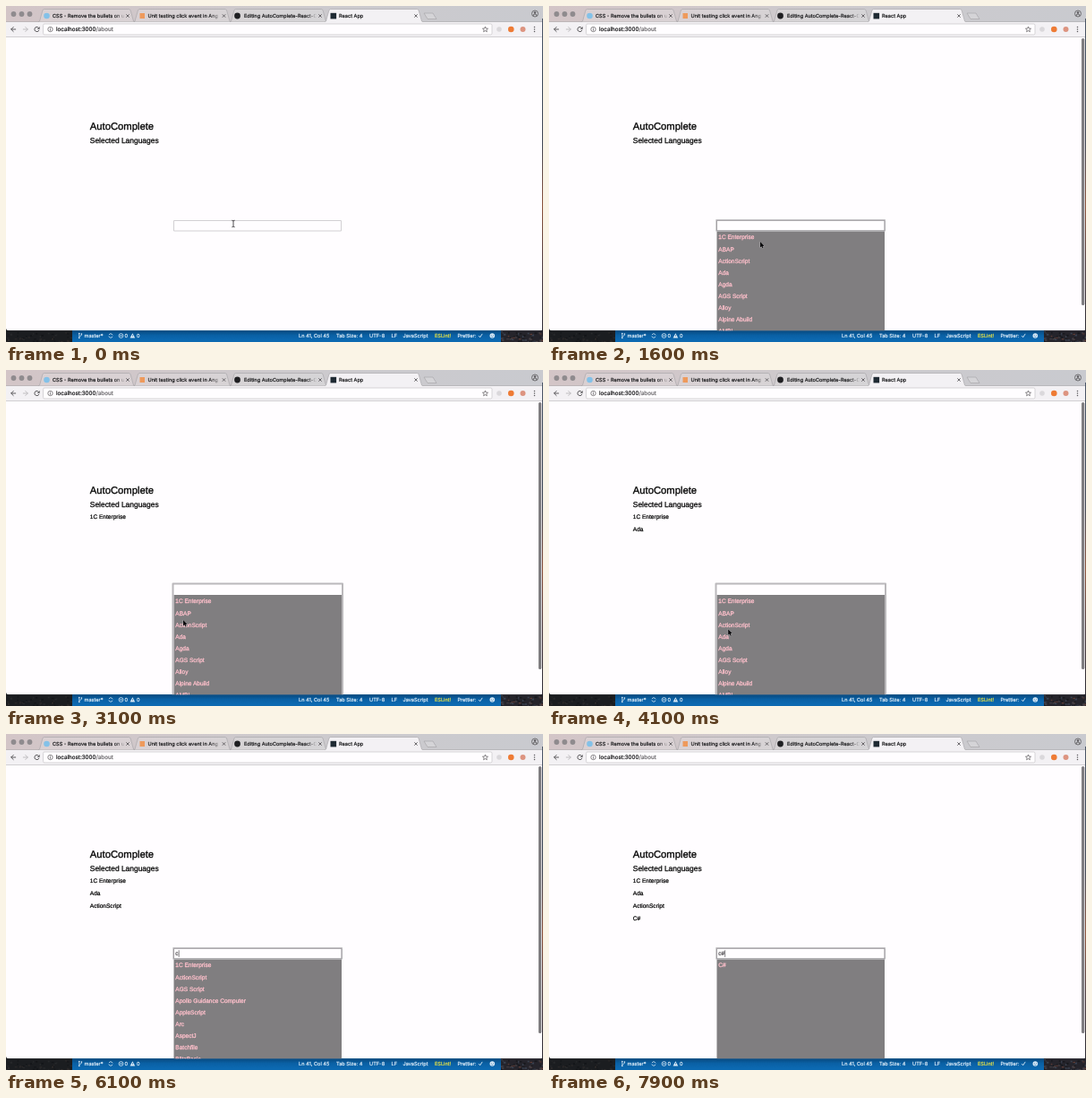
An HTML page with a canvas that plays this animation: 600x375 px, repeating every 8 s.

```html
<!DOCTYPE html>
<html lang="en">
<head>
<meta charset="utf-8">
<title>AutoComplete</title>
<style>
html, body { margin: 0; width: 100%; height: 100%; overflow: hidden; background: #fffdff; }
canvas { display: block; width: 600px; height: 375px; }
</style>
</head>
<body>
<canvas id="stage"></canvas>
<script>
const W = 600, H = 375, LOOP = 8000, STEP = 100;
const canvas = document.getElementById('stage');
const c = canvas.getContext('2d');
const dpr = window.devicePixelRatio || 1;
canvas.width = W * dpr;
canvas.height = H * dpr;

const PAGE = '"Liberation Sans", Arial, sans-serif';
const UI = 'Inter, Roboto, sans-serif';

const ALL = ['1C Enterprise', 'ABAP', 'ActionScript', 'Ada', 'Agda', 'AGS Script',
  'Alloy', 'Alpine Abuild', 'AMPL'];
const WITH_C = ['1C Enterprise', 'ActionScript', 'AGS Script', 'Apollo Guidance Computer',
  'AppleScript', 'Arc', 'AspectJ', 'Batchfile', 'BlitzBasic'];

// [time, language added to the selection]
const PICKS = [[2000, '1C Enterprise'], [3800, 'Ada'], [4600, 'ActionScript'], [7400, 'C#']];

// [time, x, y] of the pointer
const PATH = [[0, 254, 243], [100, 254, 244.5], [200, 254, 246], [900, 254, 246],
  [1300, 240, 259], [1600, 236, 263], [2000, 225, 259], [2400, 222, 259],
  [3100, 198, 279], [3500, 197, 294], [3900, 197, 294], [4400, 205, 282],
  [4700, 207, 281], [5000, 226.5, 253], [5300, 240, 246], [5800, 240, 246]];

const OPEN = 800, REFOCUS = 5400, KEY_C = 5800, KEY_HASH = 6600;

function rect(x, y, w, h, color) {
  c.fillStyle = color;
  c.fillRect(x, y, w, h);
}

function frame(x, y, w, h, color, width = 1) {
  c.strokeStyle = color;
  c.lineWidth = width;
  c.strokeRect(x, y, w, h);
}

// A hairline stroke gives the heavier look of smoothed screen type.
function text(s, x, y, size, color, family = PAGE, weight = 0.22) {
  c.font = `${size}px ${family}`;
  c.fillStyle = c.strokeStyle = color;
  c.lineWidth = weight;
  c.fillText(s, x, y);
  c.strokeText(s, x, y);
}

function dot(x, y, r, color) {
  c.fillStyle = color;
  c.beginPath();
  c.arc(x, y, r, 0, Math.PI * 2);
  c.fill();
}

function arc(x, y, r, color, width, from = 0, to = Math.PI * 2) {
  c.strokeStyle = color;
  c.lineWidth = width;
  c.beginPath();
  c.arc(x, y, r, from, to);
  c.stroke();
}

function trace(pts) {
  c.beginPath();
  for (let i = 0; i < pts.length; i += 2) c.lineTo(pts[i], pts[i + 1]);
}

function line(pts, color, width) {
  trace(pts);
  c.strokeStyle = color;
  c.lineWidth = width;
  c.stroke();
}

function poly(pts, color) {
  trace(pts);
  c.closePath();
  c.fillStyle = color;
  c.fill();
}

function gradient(x0, y0, x1, y1, ...colors) {
  const g = c.createLinearGradient(x0, y0, x1, y1);
  colors.forEach((color, i) => g.addColorStop(i / (colors.length - 1), color));
  return g;
}

function tab(x, w, title, active) {
  const fill = active ? '#f3f1f4' : 'rgba(255,255,255,0.18)';
  const edge = [x, 18, x + 1.5, 17, x + 5, 4.5, x + 6.5, 3.5,
    x + w - 6.5, 3.5, x + w - 5, 4.5, x + w - 1.5, 17, x + w, 18];
  poly(edge, fill);
  line(edge, '#a3a1a4', 0.6);
  const fade = gradient(x + 84, 0, x + 97, 0, '#1d1d1f', 'rgba(29,29,31,0)');
  text(title, x + 16, 13, 5.6, active ? '#1d1d1f' : fade, UI);
  const k = x + w - 8;
  line([k - 1.7, 9.3, k + 1.7, 12.7], '#4c4a4d', 0.8);
  line([k + 1.7, 9.3, k - 1.7, 12.7], '#4c4a4d', 0.8);
}

function tabStrip() {
  rect(0, 0, W, 18, gradient(0, 0, W, 0, '#d3c5c7', '#cdcacd', '#c9cacf'));
  for (const x of [8.5, 17.5, 26.5]) dot(x, 9, 2.9, '#8f8b8e');
  rect(0, 17.5, W, 0.7, '#a9a7aa');
  tab(36, 108, 'CSS - Remove the bullets on u', false);
  tab(142.5, 109, 'Unit testing click event in Ang', false);
  tab(250, 109, 'Editing AutoComplete-React-C', false);
  tab(356, 110, 'React App', true);
  dot(45.5, 11, 3.3, '#83c1e8');
  rect(149.5, 8, 5.5, 6, '#ee9a5c');
  dot(258.5, 11, 3.4, '#1f1f22');
  rect(362.5, 7.8, 6.6, 6.6, '#1f2a33');
  const plus = [467, 8, 477, 8, 481, 14.5, 471, 14.5];
  poly(plus, 'rgba(255,255,255,0.18)');
  line([...plus, 467, 8], '#a3a1a4', 0.6);
  arc(591, 8.5, 3.5, '#59575a', 0.8);
  dot(591, 7.4, 1.2, '#59575a');
  arc(591, 11, 2, '#59575a', 0.9, Math.PI, 0);
}

function arrow(x, dir, color) {
  line([x - 3 * dir, 26, x + 2.6 * dir, 26], color, 0.9);
  line([x, 23.2, x - 2.8 * dir, 26, x, 28.8], color, 0.9);
}

function toolbar() {
  rect(0, 18, W, 17, '#f3f1f4');
  rect(0, 34.3, W, 0.7, '#c4c2c5');
  arrow(8.5, 1, '#4a494c');
  arrow(21.5, -1, '#b9b7ba');
  arc(34.5, 26, 2.6, '#4a494c', 0.9, 0.3, 5.4);
  poly([37.6, 22.9, 37.6, 25.8, 34.7, 25.8], '#4a494c');

  c.beginPath();
  c.roundRect(41.5, 20, 501.5, 12, 1.5);
  c.fillStyle = '#fffdff';
  c.fill();
  c.strokeStyle = '#c6c4c7';
  c.lineWidth = 0.7;
  c.stroke();
  arc(49.5, 26, 2.7, '#59575a', 0.7);
  rect(49.1, 25.4, 0.8, 2.2, '#59575a');
  rect(49.1, 24.2, 0.8, 0.7, '#59575a');
  text('localhost:3000', 56, 28.2, 6.3, '#1d1d1f', UI);
  const w = c.measureText('localhost:3000').width;
  text('/about', 56 + w, 28.2, 6.3, '#6d6b6e', UI);

  const star = [];
  for (let i = 0; i <= 10; i++) {
    const r = i % 2 ? 1.4 : 3.2, a = i * Math.PI / 5 - Math.PI / 2;
    star.push(535.5 + r * Math.cos(a), 26.2 + r * Math.sin(a));
  }
  line(star, '#59575a', 0.7);
  dot(551, 26, 2.8, '#dad8db');
  dot(564.3, 26, 3.3, '#ee7b35');
  dot(577.5, 26, 3, '#dd9480');
  for (const y of [23.6, 26, 28.4]) dot(590.5, y, 0.75, '#59575a');
}

// Seeded specks for the rocky wallpaper
function specks(x, w, count, colors) {
  let seed = 7;
  const rnd = () => (seed = seed * 16807 % 2147483647) / 2147483647;
  for (let i = 0; i < count; i++) {
    rect(x + rnd() * w, 363 + rnd() * 12, 1 + rnd() * 2, 1 + rnd(),
      colors[Math.floor(rnd() * colors.length)]);
  }
}

function desktop() {
  rect(0, 355, 74, 20, '#1b1d20');
  specks(0, 74, 50, ['#26282a', '#131518', '#2d2a2a']);
  rect(553, 355, 47, 20, '#25242b');
  specks(553, 47, 60, ['#3a4250', '#5a3a34', '#17181d', '#474247']);
  rect(74, 355, 479, 20, gradient(0, 362, 0, 373, '#08487c', '#0a60a4', '#0c69b1'));

  const ink = '#dcebf7';
  const label = (s, x, color = ink) => text(s, x, 370, 5.6, color, UI);
  line([81.8, 365.5, 81.8, 370.5], ink, 0.7);
  line([84.4, 366, 84.4, 367.5, 81.8, 369], ink, 0.7);
  dot(81.8, 365.6, 0.8, ink);
  dot(81.8, 370.4, 0.8, ink);
  dot(84.4, 366, 0.8, ink);
  label('master*', 87.5);
  arc(117, 368, 2.2, ink, 0.8, 0.4, 2.9);
  arc(117, 368, 2.2, ink, 0.8, 3.6, 6);
  arc(128.5, 368, 2.4, ink, 0.8);
  line([127.5, 367, 129.5, 369], ink, 0.6);
  line([129.5, 367, 127.5, 369], ink, 0.6);
  label('0', 132.6);
  poly([141.4, 365.3, 144.2, 370.5, 138.6, 370.5], ink);
  rect(141.1, 367.1, 0.6, 1.8, '#0a60a4');
  label('0', 146);
  label('Ln 41, Col 45', 327);
  label('Tab Size: 4', 369);
  label('UTF-8', 406);
  label('LF', 430.5);
  label('JavaScript', 443.5);
  label('ESLint!', 479, '#e6e045');
  label('Prettier:', 504.5);
  line([528.3, 368, 529.6, 369.8, 532.2, 365.9], ink, 0.9);
  dot(543.3, 368, 2.8, ink);
  dot(542.3, 367.3, 0.45, '#0a60a4');
  dot(544.3, 367.3, 0.45, '#0a60a4');
  arc(543.3, 368.3, 1.2, '#0a60a4', 0.5, 0.2, 2.9);
}

// After a pick the focus sits on the whole list instead of the input.
const listFocused = t => t >= PICKS[0][0] && t < REFOCUS;

function caretOn(t) {
  if (t < OPEN || listFocused(t)) return false;
  const since = [OPEN, REFOCUS, KEY_C, KEY_HASH].filter(k => k <= t).pop();
  return (t - since) % 1000 < 500;
}

function field(t) {
  const typed = t >= KEY_HASH ? 'c#' : t >= KEY_C ? 'c' : '';
  if (t < OPEN) {
    frame(187.5, 239.5, 187, 11.5, '#d2d0d3');
    return;
  }
  const list = typed === 'c#' ? ['C#'] : typed ? WITH_C : ALL;
  rect(187.5, 251, 187.5, 112, '#807e80');
  list.forEach((name, i) =>
    text(name, 189.3, 260.4 + i * 13.125, 6.56, '#ffc0cb', PAGE, 0.3));

  rect(187.5, 239, 187.5, 12, '#fffdff');
  if (listFocused(t)) {
    frame(186.5, 238.5, 189.5, 130, '#bab8bb', 2);
  } else {
    frame(187, 238.8, 188.3, 12.2, '#c9c7ca', 1.6);
    frame(187.5, 239.4, 187.5, 11.4, '#969497', 0.8);
  }
  text(typed, 189.3, 247.4, 6.56, '#4c4a4d');
  if (caretOn(t)) rect(189.5 + c.measureText(typed).width, 241.3, 0.7, 7.6, '#4c4a4d');
}

function pointer(t) {
  if (t >= KEY_C) return;
  const i = PATH.findIndex(p => p[0] > t);
  const [t0, x0, y0] = PATH[i - 1], [t1, x1, y1] = PATH[i];
  const k = (t - t0) / (t1 - t0);
  const x = x0 + (x1 - x0) * k, y = y0 + (y1 - y0) * k;
  if (y < 250.5) {
    line([x, y - 3.3, x, y + 3.3], '#3a383b', 0.9);
    for (const s of [-1, 1]) {
      line([x - 1.7, y + 3.8 * s, x, y + 3.2 * s, x + 1.7, y + 3.8 * s], '#3a383b', 0.8);
    }
    return;
  }
  const shape = [0, 0, 0, 6.6, 1.5, 5.3, 2.5, 7.6, 3.6, 7.1, 2.6, 4.9, 4.6, 4.8];
  const pts = shape.map((v, j) => v + (j % 2 ? y : x));
  line([...pts, x, y], '#c4c2c5', 0.7);
  poly(pts, '#0c0c0e');
}

function page(t) {
  rect(0, 35, W, 327.3, '#fffdff');
  text('AutoComplete', 93.8, 138.3, 11.25, '#000', PAGE, 0.3);
  text('Selected Languages', 93.8, 152.8, 8.44, '#000', PAGE, 0.25);
  PICKS.filter(p => p[0] <= t).forEach((p, i) =>
    text(p[1], 93.8, 166 + i * 14.06, 6.56, '#000'));
  field(t);
  if (t >= OPEN) {
    c.beginPath();
    c.roundRect(595, 36, 3.3, 298, 1.6);
    c.fillStyle = '#7f7d80';
    c.fill();
  }
  pointer(t);
}

function draw(t) {
  c.setTransform(dpr, 0, 0, dpr, 0, 0);
  c.textRendering = 'geometricPrecision';
  c.lineJoin = 'round';
  desktop();
  c.save();
  c.beginPath();
  c.roundRect(0, 0, W, 362.3, [0, 0, 3, 3]);
  c.clip();
  tabStrip();
  toolbar();
  page(t);
  c.restore();
  rect(599, 14, 1, 348,
    gradient(0, 14, 0, 362, '#4a5566', '#3c4858', '#3f4552', '#8a5038', '#4a3a3e', '#2c2a32'));
}

const start = performance.now();
function tick() {
  const t = (performance.now() - start) % LOOP;
  draw(Math.floor(t / STEP) * STEP);
  requestAnimationFrame(tick);
}
tick();
</script>
</body>
</html>
```
